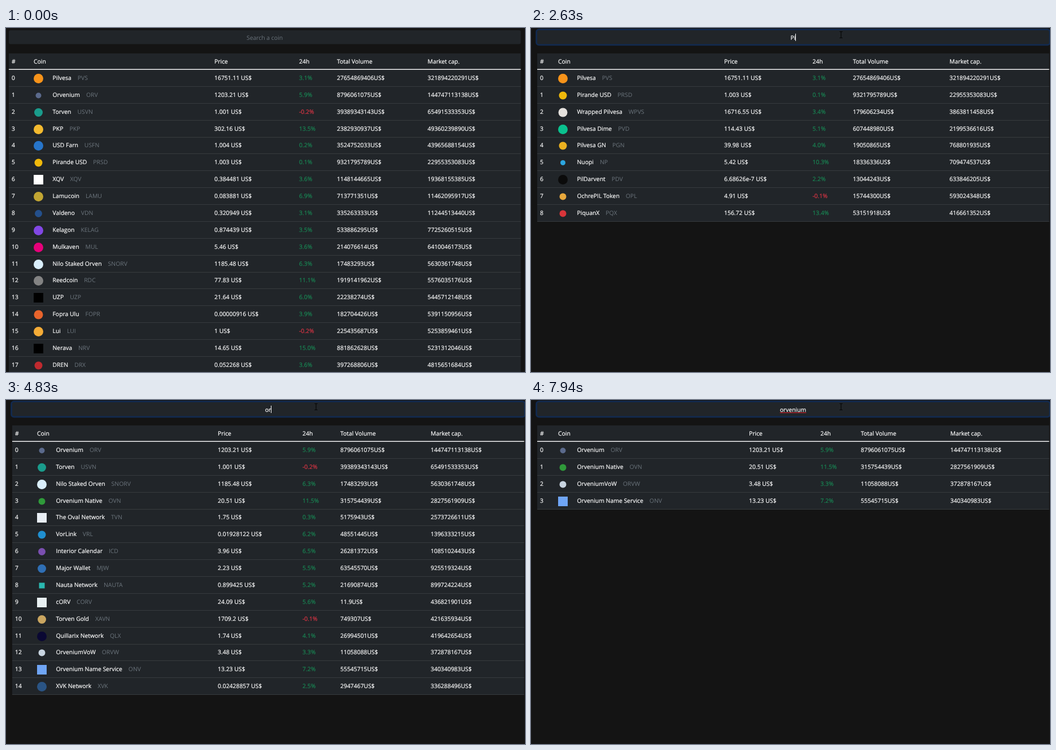
These frames come from a looping animation (919 px wide and 609 px high, 8 s). An HTML page:

```html
<!DOCTYPE html>
<html lang="en">
<head>
<meta charset="utf-8">
<title>Coin search</title>
<style>
  html, body { margin: 0; width: 100%; height: 100%; overflow: hidden; background: #141414; }
  svg { display: block; width: 919px; height: 609px; }
  text {
    font: 10.4px "Open Sans", "Noto Sans", sans-serif; text-rendering: geometricPrecision;
    color: #fff; fill: currentColor; stroke: currentColor; stroke-width: .2px;
  }
  .muted { color: #6c757d; fill: currentColor; stroke: none; }
  .up { color: #198754; }
  .down { color: #dc3545; }
  .panel { fill: #212529; }
</style>
</head>
<body>
<svg viewBox="0 0 919 609">
  <rect id="ring" fill="#0d6efd" fill-opacity=".25"/>
  <rect id="field" class="panel" y="4" width="906.5" height="24.5" rx="3"/>
  <text id="query" y="21" text-anchor="middle"></text>
  <rect id="typo" y="22" height="1" fill="#e0202c"/>
  <rect id="caret" y="10" width="1" height="13" fill="#fff"/>
  <g id="table"></g>
  <path id="pointer" d="M-2.5-5.5h2l.5.5.5-.5h2M0-5V5M-2.5 5.5h2l.5-.5.5.5h2" fill="none" stroke="#000"/>
</svg>
<script>
const LOOP = 8000, BLINK = 530, FOCUS = 1150, CHECKED = 7340;
const HEAD = 73.6, ROW = 29.88;
const $ = id => document.getElementById(id);
const set = (id, attrs) => {
  for (const k in attrs) $(id).setAttribute(k, attrs[k]);
};

// name | symbol | price | 24h | volume | market cap | icon colour | icon shape and size
const coins = `
Pilvesa|PVS|16751.11|3.1|27654869406|321894220291|f7931a|c17
Orvenium|ORV|1203.21|5.9|8796061075|144747113138|5b6a8c|c10
Torven|USVN|1.001|-0.2|39389343143|65491533353|1a9c8c|c15
PKP|PKP|302.16|13.5|2382930937|49360239890|f3ba2f|c17
USD Farn|USFN|1.004|0.2|3524752033|43965688154|2775ca|c17
Pirande USD|PRSD|1.003|0.1|9321795789|22955353083|f0b90b|c14
XQV|XQV|0.384481|3.6|1148144665|19368155385|ffffff|s17
Lamucoin|LAMU|0.083881|6.9|713771351|11462095917|c2a633|c17
Valdeno|VDN|0.320949|3.1|335263333|11244513440|24508c|c13
Kelagon|KELAG|0.874439|3.5|533886295|7725260515|8247e5|c17
Mulkaven|MUL|5.46|3.6|214076614|6410046173|e6007a|c17
Nilo Staked Orven|SNORV|1185.48|6.3|17483293|5630361748|d9eefb|c17
Reedcoin|RDC|77.83|11.1|1919141962|5576035176|838383|c17
UZP|UZP|21.64|6.0|22238274|5445712148|000000|s17
Fopra Ulu|FOPR|0.00000916|3.9|182704426|5391150956|e8642c|c16
Lui|LUI|1|-0.2|225435687|5253859461|f5ac37|c17
Nerava|NRV|14.65|15.0|881862628|5231312046|000000|s17
DREN|DRX|0.052268|3.6|397268806|4815651684|c02a2f|c14
Wrapped Pilvesa|WPVS|16716.55|3.4|179606234|3863811458|e4e0dc|c16
Pilvesa Dime|PVD|114.43|5.1|607448980|2199536616|0ac18e|c17
Pilvesa GN|PGN|39.98|4.0|19050865|768801935|eab020|c14
Nuopi|NP|5.42|10.3|18336336|709474537|2ca6e0|c9
PilDarvent|PDV|6.68626e-7|2.2|13044243|633846205|0b0b0b|c17
OchrePIL Token|OPL|4.91|-0.1|15744300|593024348|e8a83c|c12
PiquanX|PQX|156.72|13.4|53151918|416661352|d8353a|c12
Orvenium Native|OVN|20.51|11.5|315754439|2827561909|2f9a3a|c12
The Oval Network|TVN|1.75|0.3|5175943|2573726611|e8eef4|s17
VorLink|VRL|0.01928122|6.2|48551445|1396333215|1f8fd0|c14
Interior Calendar|ICD|3.96|6.5|26281372|1085102443|7a4fb0|c13
Major Wallet|MJW|2.23|5.5|63545570|925519324|2f6fb5|c15
Nauta Network|NAUTA|0.899425|5.2|21690874|899724224|2ab8b0|s10
cORV|CORV|24.09|5.6|11.9|436821901|e8f0f2|s17
Torven Gold|XAVN|1709.2|-0.1|749307|421635934|c9a560|c15
Quillarix Network|QLX|1.74|4.1|26994501|419642654|0a0833|c17
OrveniumVoW|ORVW|3.48|3.3|11058088|372878167|c8d4e0|c12
Orvenium Name Service|ONV|13.23|7.2|55545715|340340983|6fa5f5|s17
XVK Network|XVK|0.02428857|2.5|2947467|336288496|2a5484|c17`.trim().split("\n").map(line => line.split("|"));

["Dupren", "Palune", "Sapwen", "Lumper", "Tepka"].forEach((name, i) => {
  const cap = Math.round(1934857213 * .78 ** i);
  coins.push([name, name.slice(0, 3).toUpperCase(), (cap % 977 / 100).toFixed(2),
    (2.4 + i * 1.3).toFixed(1), Math.round(cap / 23), cap, ["3a7bd5", "d0a040", "40a080"][i % 3], "c16"]);
});
coins.sort((a, b) => b[5] - a[5]);

// Left edges: coin, price, 24h, volume, market cap
const wide = [49, 369, 519, 586, 746.5];
const long = [55, 375, 525, 592, 752];
const mixed = [48, 342, 498.5, 570, 741];
const first = [49, 353, 495.5, 559, 735];
const middle = [48, 373, 520, 589, 750];
const second = [48, 386, 512.5, 584, 742.5];

const typing = [
  [0, "", wide], [2430, "P", long], [2630, "Pi", mixed], [2700, "Pil", mixed],
  [3030, "Pilv", first], [3130, "Pilve", first], [3230, "Pilves", first], [3430, "Pilvesa", first],
  [4230, "", wide], [4500, "o", wide], [4830, "or", long], [4960, "orv", middle],
  [5060, "orve", middle], [5160, "orven", middle],
  [5300, "orveni", second], [5360, "orveniu", second], [6350, "orvenium", second]
];

// time, x, y
const path = [[590, 516, 97], [800, 533, 42], [1010, 545, 6], [1080, 545, 10], [1150, 549, 12]];

const label = (x, s, cls = "") => `<text x="${x}" class="${cls}">${s}</text>`;

function icon(x, color, shape) {
  const d = +shape.slice(1), r = shape[0] === "c" ? d / 2 : 0;
  return `<rect x="${x + 8.5 - d / 2}" y="${-2.5 - d / 2}" width="${d}" height="${d}" rx="${r}" fill="#${color}"/>`;
}

// Rows sit on whole pixels so that text and lines stay crisp
function row([name, symbol, price, change, volume, cap, color, shape], i, left, cols) {
  const [coin, ...x] = cols;
  return `<g transform="translate(0 ${Math.round(HEAD + ROW * i + 18.3)})">` +
    label(left + 5, i) + icon(coin, color, shape) +
    label(coin + 33.5, `${name}<tspan dx="11" class="muted">${symbol}</tspan>`) +
    label(x[0], price + " US$") +
    label(x[1], change + "%", change < 0 ? "down" : "up") +
    label(x[2], volume + "US$") + label(x[3], cap + "US$") +
    `<rect x="${left}" y="11" width="906.5" height="1" fill="#373b3e"/></g>`;
}

let shown, left, textEnd;

function showQuery(step) {
  const [, query, cols] = step, q = query.toLowerCase();
  const found = coins.filter(c => (c[0] + "|" + c[1]).toLowerCase().includes(q));
  left = found.length > 17 ? 5 : 11;
  const titles = ["Coin", "Price", "24h", "Total Volume", "Market cap."];
  $("table").innerHTML =
    `<rect class="panel" x="${left}" y="45" width="906.5" height="${Math.round(HEAD - 45 + ROW * found.length)}"/>` +
    `<g transform="translate(0 63)">${label(left + 5, "#")}${titles.map((s, i) => label(cols[i], s)).join("")}</g>` +
    `<rect x="${left}" y="72.6" width="906.5" height="1.4" fill="#fff"/>` +
    found.slice(0, 18).map((c, i) => row(c, i, left, cols)).join("");

  const mid = left + 453;
  $("query").textContent = query || "Search a coin";
  set("query", { x: mid, class: query ? "" : "muted" });
  const width = query ? $("query").getComputedTextLength() : 0;
  textEnd = mid + width / 2;
  set("caret", { x: Math.round(textEnd - .5) });
  set("typo", { x: mid - width / 2, width });
  set("field", { x: left });
  shown = step;
}

function movePointer(t) {
  const s = 590 + Math.floor((t - 590) / 70) * 70;
  const i = Math.max(1, path.findIndex(p => p[0] >= s));
  const [a, b] = s >= FOCUS ? path.slice(-2) : [path[i - 1], path[i]];
  const k = Math.min(1, (s - a[0]) / (b[0] - a[0]));
  const at = n => a[n] + (b[n] - a[n]) * k;
  set("pointer", { transform: `translate(${at(1)} ${at(2)})`, visibility: t < 590 ? "hidden" : "visible" });
}

function draw(now) {
  const t = now % LOOP;
  const step = typing.findLast(s => s[0] <= t);
  if (step !== shown) showQuery(step);

  const grow = Math.max(0, Math.min(1, (t - FOCUS) / 150));
  const m = 2.75 * grow;
  set("ring", { x: left - m, y: 4 - m, width: 906.5 + 2 * m, height: 24.5 + 2 * m, rx: 3 + m, opacity: grow });

  const since = t - Math.max(FOCUS, step[0]);
  const lit = since >= 0 && Math.floor(since / BLINK) % 2 === 0;
  set("caret", { visibility: lit ? "visible" : "hidden" });
  set("typo", { visibility: t >= CHECKED ? "visible" : "hidden" });
  movePointer(t);
}

const start = performance.now();
function tick() {
  draw(performance.now() - start);
  requestAnimationFrame(tick);
}
tick();
</script>
</body>
</html>
```
